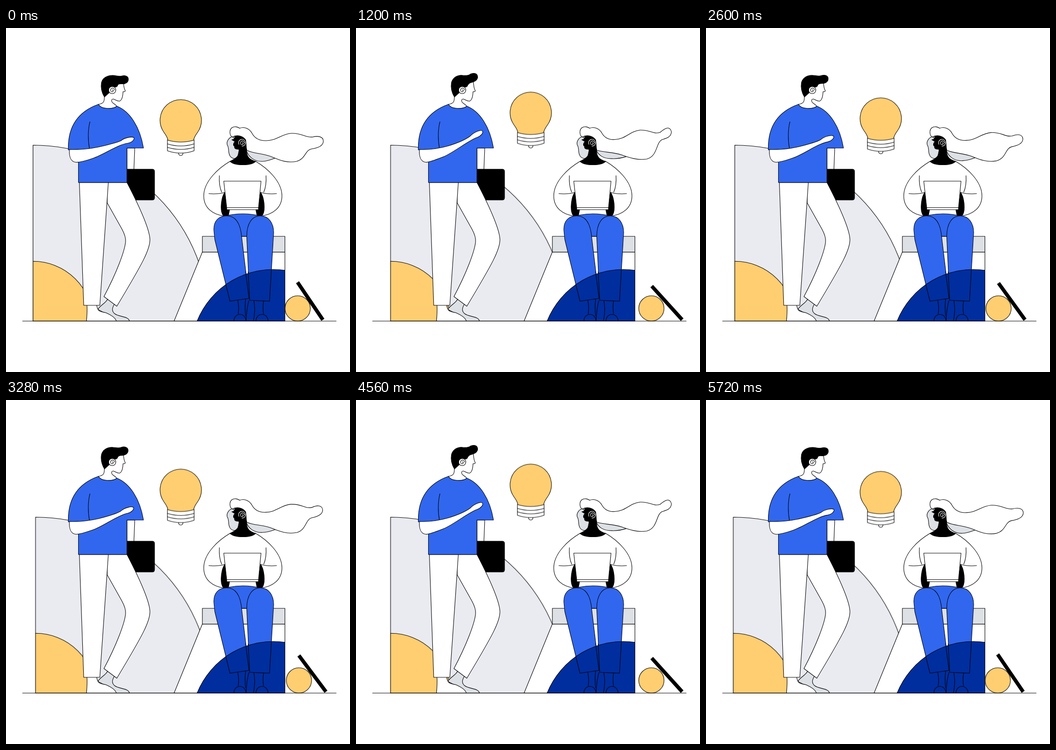
An HTML page for the animation above (5760 ms loop, 748x748 px).

```html
<!DOCTYPE html>
<html lang="en">
<head>
<meta charset="utf-8">
<title>Sharing an idea</title>
<style>
  html, body { margin: 0; width: 100%; height: 100%; overflow: hidden; background: #fff; }
  svg { display: block; width: 100vw; height: 100vh; }

  .line { fill: none; }
  .white { fill: #fff; }
  .black { fill: #000; }
  .blue { fill: #3167ee; }
  .navy { fill: #002e9e; }
  .amber { fill: #ffce70; }
  .mist { fill: #eaebf0; }
  .grey { fill: #dde1e6; }

  /* Everything sways linearly out and back with the same beat. */
  .sway { animation: 1440ms linear infinite alternate; }
  .arcs { animation-name: arcs; }
  .bulb { animation-name: bulb; }
  .ball { animation-name: ball; }
  .bar { animation-name: bar; }
  .arm { animation-name: arm; }
  .quiff { animation-name: quiff; }
  .mane { animation-name: mane; }
  .under { animation-name: under; }

  @keyframes arcs { to { transform: translateX(19.7px); } }
  @keyframes bulb { to { transform: translateY(-19.7px); } }
  @keyframes ball { to { transform: translateX(9.7px); } }
  @keyframes bar {
    from { transform: translate(689px, 634.5px) rotate(56deg); }
    to { transform: translate(713.2px, 634.2px) rotate(46.2deg); }
  }
  @keyframes arm {
    from { d: path("M138 264C158 265 180 263 200 259C222 254 240 250 250 245C258 238 276 235 278.5 239C279 243 274 249 265 250.5C244 253 213 275 190 283C170 290 160 292 152 292C140 291 137 278 138 264Z"); }
    to { d: path("M138 264C158 265 180 262 200 256C222 249 238 241 248 233C257 223 272 217 274.5 221.5C276.6 225 271.6 232.2 263 235.5C244 243 211 271 190 279.5C170 287 160 292 152 292C140 291 137 278 138 264Z"); }
  }
  @keyframes quiff {
    from { d: path("M214 150C208 140 206 128 207.500 119C210 108 221 102.500 233 103C240 103.500 246 106 251 104.500C258 102.500 265 104 266 110C267 118 260 122 252 121.500C247 121 244 122 243 124C242 128 239 129 236 128L224 141Z"); }
    to { d: path("M214 150C208 140 206 128 207.500 119C210 108 221 101 232 103C239 104 245 102.4 248.6 99.2C254.4 96 262.6 97 263.8 103C265.8 110 260 115 252 117.5C247 119 245 121 243 124C242 128 239 129 236 128L224 141Z"); }
  }
  @keyframes mane {
    from { d: path("M492 237C486 234 485 222 491 217C497 213 504 215 508 218C515 215 528 216 535 229C541 240 552 245.5 566 245C588 245 598 231 620 229C645 228 650 239 667 237C678 234 690 236 690 246C690 256 678 261 664 263C650 266 652 284 632 290C612 294 596 288 580 281C560 272 540 274 524 266C522 262 522 245 521 243C515 235 503 231 492 237Z"); }
    to { d: path("M492 237C486 234 485 222 491 217C497 213 504 215 508 218C515 215 528 216 535 229C541 239 550 243 562 242C587 241 593 224 617 220.6C641 219.6 644 230.6 660 225C670 215 681 206.5 685 222C684 234.4 673 235.8 665 239C652.4 246.8 656.8 278 632 284C612 286.8 593.6 280.8 577.6 275C560 269.4 540 270 524 266C522 262 522 245 521 243C515 235 503 231 492 237Z"); }
  }
  @keyframes under {
    from { d: path("M522 264C526 280 540 291 558 290C573 289 580 284 590 281L560 265Z"); }
    to { d: path("M522 264C526 276 538 283 556 283C572 284 582 281 590 278.5L560 265Z"); }
  }
</style>
</head>
<body>
<svg viewBox="0 0 748 748" stroke="#000" stroke-width="1.1" stroke-linejoin="round" stroke-linecap="round">
  <defs>
    <path id="swirl" d="M0 0a1.8 1.8 0 0 1 2.6 1.2a3.2 3.2 0 0 1-5.6 1.3a4.6 4.6 0 0 1 3-7a5 5 0 0 1 5 4.5"/>
    <!-- one half of the seated torso, mirrored for the other side -->
    <g id="side">
      <path class="line" d="M464 321C463 338 465 348 469 357M441 360C452 361.500 466 360 476 357.500"/>
      <path class="black" d="M476 357C468 367 465 395 471 406C474 410 482 410 484 406L486 396L480 391Z"/>
    </g>
  </defs>

  <!-- backdrop -->
  <g class="sway arcs">
    <path class="mist" d="M58.7 637.3V254.8A382.5 382.5 0 0 1 441.2 637.3Z"/>
    <path class="amber" d="M58.7 637.3V507.3A130 130 0 0 1 188.7 637.3Z"/>
  </g>
  <path class="white" d="M365.5 637.3L427 487H606.5V637.3Z"/>
  <rect class="grey" x="427" y="453" width="179.5" height="34.4"/>

  <!-- ball and bar -->
  <circle class="amber sway ball" cx="634.2" cy="609.7" r="27.5"/>
  <rect class="black sway bar" x="-98.5" y="-4" width="98.5" height="8" stroke="none"/>

  <!-- bulb -->
  <g class="sway bulb">
    <circle class="white" cx="380" cy="272.5" r="4.8"/>
    <path class="white" d="M351 243V267Q380 277 409 267V243Z"/>
    <path class="line" d="M351 252Q380 261 409 252M351 259.500Q380 268.500 409 259.500"/>
    <path class="amber" d="M352 244C351 237 347 232 343.5 227A45 45 0 1 1 416.5 227C413 232 409 237 408 244Q380 252 352 244Z"/>
  </g>

  <!-- standing man -->
  <path class="grey" d="M222 588C218 598 203 604 200 612L215 620C228 624 236 630 239 637.3H268.5C266 626 246 629 236 621C229 615 231 608 236 600Z"/>
  <path class="white" d="M176 602C177 615 176 626 175 637.3H240C237 629 228 624 217 619C208 617 204 617 201.5 614C198 610 198 607 197 602Z"/>
  <path class="white" d="M263 261H280L278 310H263Z"/>
  <path class="black" d="M263 307H318Q323 307 323 312V369Q323 374 318 374H263Z"/>
  <path class="white" d="M220 336V380L252 437C258 448 261 456 260 465C258 486 240 533 213 584L241 605C298 510 313 482 313 460C312 436 290 388 263 336Z"/>
  <path class="white" d="M159.5 336L169 603H204L222.5 336Z"/>
  <path class="white" d="M214 148C214 160 213 164 201 166C207 180 235 180 241 170C236 164 228 163 230 156C234 151 239 160 247 159C252 157 254 150 254.500 138.500C257 138.500 260.500 138 259 135.500C256 131 256 124 255 116L225 112Z"/>
  <path class="blue" d="M201 166C207 177 232 177 241 170C269 181 291 214 299 261H263V336H157.5V264L135.5 265C134 215 156 182 201 166Z"/>
  <path class="line" d="M182.5 204C178 221 178 244 181.500 262"/>
  <path class="white sway arm"/>
  <path class="black sway quiff"/>
  <circle class="white" cx="231" cy="135" r="7.8"/>
  <use href="#swirl" class="line" x="231" y="135"/>

  <!-- seated woman -->
  <path class="grey" d="M492 236C484 239 479 247 481 254C485 260 483 265 485 273C487 282 494 285 503 284L510 250Z"/>
  <path class="grey sway under"/>
  <path class="white" d="M487 290C463 304 430 333 430 365C430 391 449 406 476 409H553C580 406 600 391 600 365C600 333 567 304 543 290Z"/>
  <path class="black" d="M496 234C499 239 497 242 491 243L498 247C493 252 494 256 497 257C496 262 499 264 507 264C507 277 504 282 487 290C497 300 533 300 543 290C529 286 524 280 523 268L524 240L508 230Z"/>
  <path class="white sway mane"/>
  <circle class="black" cx="513.5" cy="249.500" r="7.500" stroke="none"/>
  <g stroke="#fff">
    <use href="#swirl" class="line" x="513.5" y="250"/>
    <path class="line" d="M506.500 253A7.5 7.5 0 1 1 513 257"/>
  </g>

  <path class="blue" d="M476 409Q515 399 554 409L530 453H510Z"/>
  <use href="#side"/>
  <use href="#side" transform="translate(1029.4) scale(-1 1)"/>
  <path class="white" d="M473.500 333H554.500L549 391V395H480V391Z"/>
  <path class="line" d="M480 390.500H549"/>
  <path class="blue" d="M500 415H535L524 453H512Z" stroke="none"/>
  <path class="line" d="M512 453H524"/>
  <g class="blue">
    <path d="M452 440C451 420 462 408.500 480 408.500C500 408.500 510 425 512.500 455L528.500 588L487 594L454 460Z"/>
    <path d="M523.500 455C523 425 535 408.500 553 408.500C572 408.500 582 425 582 445L573 594L530 592Z"/>
  </g>

  <path class="navy" d="M415.500 637.3A179 179 0 0 1 606.500 526.700V637.3Z"/>
  <path class="line" d="M478 558L487 594L528.500 588L521 530M526.500 530L530 592L573 594L577 526"/>
  <path class="line" d="M504 592Q507 607 505 622M521 589Q519 607 521 626M528 593Q523 612 522 637M495.500 637C496 618 521 618 522 637"/>
  <path class="line" d="M539 593Q543 615 538 637M560 594Q558 608 560 622M543.500 637C544 618 569 618 570 637"/>

  <path class="line" d="M36 637.3H718"/>
</svg>
</body>
</html>
```
